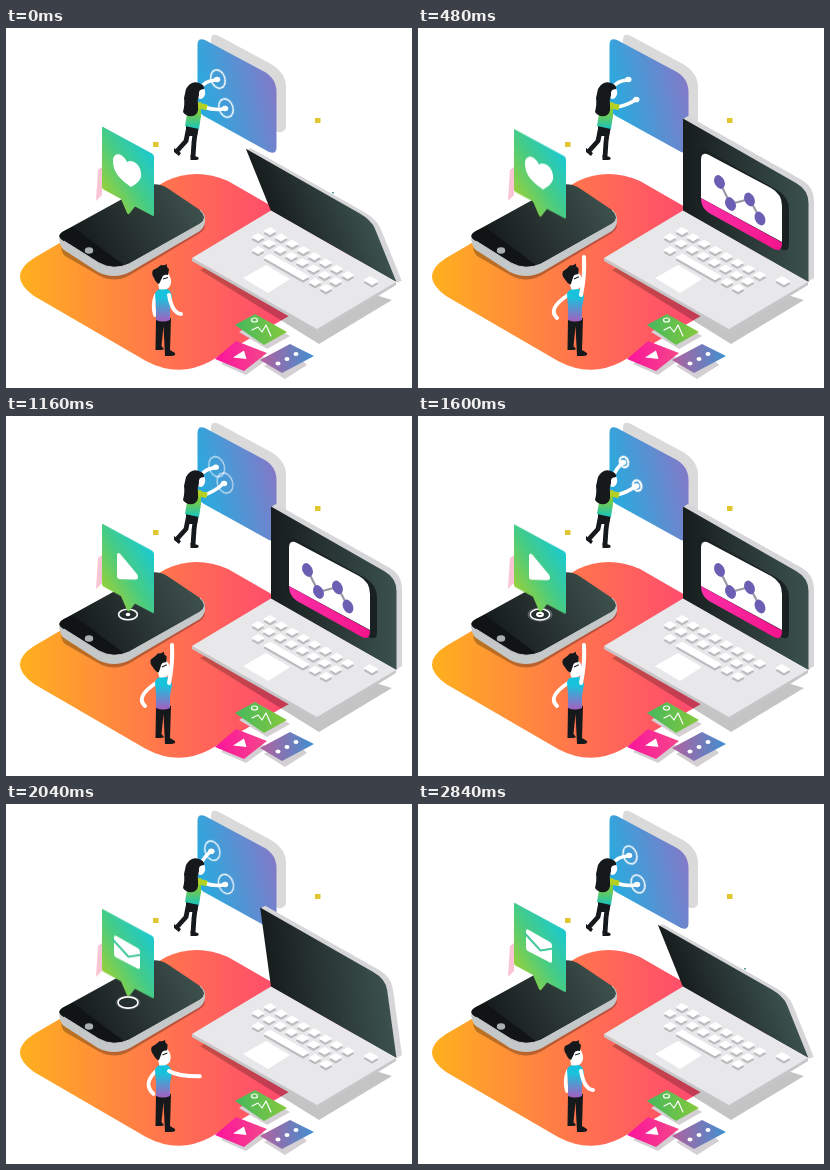
An HTML page for the animation above (2880 ms loop, 406x360 px).

```html
<!DOCTYPE html>
<html lang="en">
<head>
<meta charset="utf-8">
<title>Isometric devices</title>
<style>
html, body { margin: 0; width: 100%; height: 100%; overflow: hidden; background: #fff; }
svg { display: block; width: 100%; height: 100%; }
.line { fill: none; stroke: #fff; stroke-linecap: round; stroke-linejoin: round; }

#bubble { animation: bob 2880ms infinite; }
@keyframes bob {
  0%, 100% { transform: translateY(0); animation-timing-function: cubic-bezier(.37,0,.63,1); }
  50% { transform: translateY(10px); animation-timing-function: cubic-bezier(.37,0,.63,1); }
}

.icon { animation: show 2880ms steps(1) infinite; }
.play { animation-delay: -1920ms; }
.mail { animation-delay: -960ms; }
@keyframes show { 0% { visibility: visible; } 33.333%, 100% { visibility: hidden; } }

#screen { animation: screen 2880ms linear infinite; }
@keyframes screen { 0%, 6.5% { opacity: 0; } 16.5%, 56% { opacity: 1; } 63%, 100% { opacity: 0; } }

.ripple { fill: none; stroke: #fff; animation: ripple 2880ms linear infinite; }
@keyframes ripple {
  0% { rx: 0; ry: 0; stroke-width: 2.4px; opacity: 1; animation-timing-function: ease-out; }
  19% { rx: 10px; ry: 5.6px; stroke-width: 1.6px; opacity: 1; }
  35%, 100% { rx: 12.5px; ry: 7px; stroke-width: .8px; opacity: 0; }
}

.tap { fill: none; stroke: #fff; animation: tap 960ms -400ms linear infinite; }
@keyframes tap {
  0% { rx: 3px; ry: 4px; stroke-width: 2.6px; opacity: 1; animation-timing-function: ease-out; }
  54% { rx: 7.2px; ry: 10px; stroke-width: 1.3px; opacity: 1; }
  84%, 100% { rx: 8.5px; ry: 11.5px; stroke-width: .7px; opacity: 0; }
}
</style>
</head>
<body>
<svg viewBox="0 0 406 360">
  <defs>
    <linearGradient id="rugFill"><stop stop-color="#ffb01e"/><stop offset=".45" stop-color="#ff7150"/><stop offset=".75" stop-color="#ff4d6c"/><stop offset="1" stop-color="#ff4570"/></linearGradient>
    <linearGradient id="panelFill" x1="0" y1=".75" x2="1" y2=".4"><stop stop-color="#1fb0e0"/><stop offset="1" stop-color="#8379c8"/></linearGradient>
    <linearGradient id="bubbleFill" x1=".15" y1="1" x2=".95" y2=".2"><stop stop-color="#a8d22a"/><stop offset=".5" stop-color="#48cc83"/><stop offset="1" stop-color="#16c9d8"/></linearGradient>
    <linearGradient id="glass"><stop stop-color="#171d1d"/><stop offset="1" stop-color="#3b514d"/></linearGradient>
    <linearGradient id="phoneFill" x1="0" y1=".6" x2="1" y2=".3"><stop stop-color="#111516"/><stop offset="1" stop-color="#3f524e"/></linearGradient>
    <linearGradient id="manShirt" x1="0" y1="0" x2="0" y2="1"><stop offset=".25" stop-color="#17c3dc"/><stop offset="1" stop-color="#a55fc0"/></linearGradient>
    <linearGradient id="womanShirt" x1="0" y1="0" x2="0" y2="1"><stop stop-color="#b6d021"/><stop offset=".4" stop-color="#79cc42"/><stop offset="1" stop-color="#17c4c0"/></linearGradient>
    <linearGradient id="greenCard"><stop stop-color="#45b85e"/><stop offset="1" stop-color="#86c93c"/></linearGradient>
    <linearGradient id="pinkCard"><stop stop-color="#fb149a"/><stop offset="1" stop-color="#f5478c"/></linearGradient>
    <linearGradient id="purpleCard"><stop stop-color="#b4609f"/><stop offset="1" stop-color="#3f90d0"/></linearGradient>
    <linearGradient id="strip"><stop stop-color="#fb2fa6"/><stop offset="1" stop-color="#f4148c"/></linearGradient>
  </defs>

  <!-- rug -->
  <path fill="url(#rugFill)" d="M28 230L160 153Q190 139 222 153L335 218Q369 238 335 258L203 334Q172 350 140 333L28 268Q0 248 28 230Z"/>

  <!-- wall panel -->
  <path fill="#dadada" d="M205 12Q205 4 213 8L265 36Q280 45 280 59V98Q280 105 272 104L205 66Z"/>
  <path fill="url(#panelFill)" d="M191.500 17Q191.500 9 199 12L257 43Q270.500 50 270.500 64V119Q270.500 127 263 124L198 88Q191.500 84 191.500 78Z"/>

  <path fill="#e0c62f" d="M147 114h5.500v5h-5.500zM309 90h5.500v5h-5.500z"/>
  <path fill="#5f9f99" d="M326 164h2v1.500h-2z"/>
  <path fill="#f9c4d4" d="M92 142L96 139V167L90 173Z"/>

  <!-- phone -->
  <g>
    <path fill="#000" opacity=".27" d="M57 217L150 164L197 193Q202 199 194 205L124 247Q108 256 92 247L59 228Q53 222 57 217Z"/>
    <path fill="#c4c8c9" d="M53 207L199 190Q200 198 194 203L124 244Q108 252 92 244L58 222Q53 218 53 207Z"/>
    <path fill="url(#phoneFill)" d="M58 203L138 159Q150 153 162 160.500L194 182Q203 190 194 196L123 236Q108 243 93 235L58 213Q49 208 58 203Z"/>
    <path fill="#101415" d="M67 199L117 236.500Q106 242 93 235L58 213Q49 208 58 203Z"/>
    <path fill="none" stroke="#c9cdce" d="M194 182Q203 190 194 196L123 236Q108 243 93 235L58 213"/>
    <ellipse cx="83" cy="222.500" rx="4.200" ry="3.200" fill="#a9afb0"/>
    <ellipse class="ripple" cx="122" cy="198.500" style="animation-delay:-2160ms"/>
    <ellipse class="ripple" cx="122" cy="198.500" style="animation-delay:-1760ms"/>
    <ellipse class="ripple" cx="122" cy="198.500" style="animation-delay:-1380ms"/>
  </g>

  <g id="bubble">
    <path fill="url(#bubbleFill)" d="M96 100Q96 98 98 99.500L146 125.500Q148 126.500 148 129V186Q148 189 146 187.500L129 178.500L123.500 185.500Q122 187 121 185L115 171L97.500 161.500Q96 160.500 96 159Z"/>
    <path class="icon" fill="#fff" d="M121 134C116 124 107 124 107 133C107 145 115 152 125 159C132 155 136 151 135 145C134 135 125 131 121 134Z"/>
    <path class="icon play" fill="#fff" d="M111 130Q111 127 114 128.500L131 149Q134 154 129 154.500L114 154Q111 154 111 151Z"/>
    <g class="icon mail">
      <path fill="#fff" d="M108 127Q108 124 111 126L132 138Q134 139 134 142V157Q134 160 131 158L110 147Q108 146 108 143Z"/>
      <path fill="none" stroke="#42c79a" stroke-width="2" d="M107 129.500L122.500 146.500L135 144.500"/>
    </g>
  </g>

  <!-- laptop -->
  <path fill="#000" opacity=".23" d="M194 242L230 225L386 272L313 316Z"/>
  <g id="lid">
    <path id="rim" fill="#d6d6d8" d="M265 91L270 88L384 152Q396 159 396 173V250L390 254L265 183Z"/>
    <path fill="url(#glass)" d="M265 90.500L378 155Q390.500 162 390.500 175V254L265 183Z"/>
    <g id="screen">
      <path fill="#1a2122" d="M279 127Q279 118 287 122L359 162Q371 169 371 181V216Q371 225 363 221L286 180Q279 176 279 169Z"/>
      <path fill="#fff" d="M283 132Q283 123 291 127L353 160Q364 166 364 178V214L283 170Z"/>
      <path fill="url(#strip)" d="M283 170L364 214.500Q364 225 356 221L291 185Q283 180 283 170Z"/>
      <path fill="none" stroke="#9a9aa5" stroke-width="2.200" d="M301.500 154L312.500 176L331.500 171L342 190.500"/>
      <g id="nodes" fill="#6b5fb4"></g>
    </g>
  </g>
  <path fill="#c6c6c9" d="M186 230L311 300L390 253V257L312 305L186 233Z"/>
  <path fill="#e8e8ea" d="M265 182.500L390 254L311 301L186 230Z"/>
  <path fill="#fff" d="M260 237L284 251L262 265L237 250Z"/>
  <g id="keys"></g>

  <!-- cards -->
  <g fill="#d3cfd2">
    <path d="M233 304L254 291L284 308L261 321Z"/><path d="M215 336L233 319L262 331L240 347Z"/><path d="M258 338L286 322L301 337L279 351Z"/>
  </g>
  <path fill="url(#greenCard)" d="M229 297L249 286L281 304L258 317Z"/>
  <path class="line" stroke-width="1.200" d="M246 302L252 299L256 304L260 297L265 308"/>
  <ellipse class="line" cx="248.500" cy="292" rx="3" ry="2" stroke-width="1.200"/>
  <path fill="url(#pinkCard)" d="M209 331L230 313L261 325L238 343Z"/>
  <path fill="#fff" d="M227 329.500L238 322.500L240.500 331Z"/>
  <path fill="url(#purpleCard)" d="M254 332L284 316L308 328L276 345Z"/>
  <g fill="#fff"><ellipse cx="272" cy="335.500" rx="2.500" ry="2"/><ellipse cx="281" cy="331" rx="2.500" ry="2"/><ellipse cx="290" cy="326" rx="2.500" ry="2"/></g>

  <!-- woman -->
  <g>
    <path fill="none" stroke="#15191b" stroke-width="4.800" stroke-linejoin="round" d="M183 98L180 113L171 123M190 98L188 114L187 129"/>
    <path fill="#15191b" d="M180 97L193 99L191 108H180ZM168 120L175 125L173 128L168 124ZM184.500 127L192 129Q194 132 190 132H184.500Z"/>
    <path fill="url(#womanShirt)" d="M183 75L195 74L195 88L193 101L179 98L181 86Z"/>
    <path class="line" id="armTop" stroke-width="3.600"/>
    <path class="line" id="armLow" stroke-width="3.600"/>
    <path fill="none" stroke="#b4d022" stroke-width="5.500" d="M191 77L201 79.500"/>
    <ellipse cx="194.500" cy="64.500" rx="4.700" ry="6.500" fill="#fff"/>
    <path fill="#15191b" d="M180 61Q185 52 193 55Q199 57 198 61Q192 61 193 67Q191 72 192 78Q193 86 187 88Q180 89 177 84Q179 76 178 70Z"/>
    <g id="handTop"><ellipse cx="-1" cy=".5" rx="3.200" ry="2.800" fill="#fff"/><ellipse class="tap" transform="rotate(-20)"/></g>
    <g id="handLow"><ellipse cx="-1" cy=".5" rx="3.200" ry="2.800" fill="#fff"/><ellipse class="tap" transform="rotate(-20)"/></g>
  </g>

  <!-- man -->
  <g>
    <path class="line" id="armLeft" stroke-width="3.800"/>
    <path fill="#15191b" d="M150 290H165L164 322L169 325Q170 328 165 328H159L157.500 298L155.500 318L158 321Q157 322 155 322H149.500Z"/>
    <path fill="url(#manShirt)" d="M149 266Q150 262 154 261H161Q165 262 166 269L164 280V292Q157 295 150 292V279Z"/>
    <path class="line" id="armRight" stroke-width="4"/>
    <g id="head">
      <path fill="#fff" d="M151 248L162 245Q167 252 164 258Q161 263 153 261Z"/>
      <path fill="#15191b" d="M147 242Q152 240 155 237Q158 238 161 236Q160 239 163 241L162 247Q157 246 156 250L153 256Q150 255 148 250Q145 246 147 242Z"/>
      <path fill="none" stroke="#15191b" stroke-width="1" d="M157 251L162 249.500"/>
    </g>
  </g>
</svg>
<script>
const LOOP = 2880;
const el = id => document.getElementById(id);
const mix = (a, b, p) => a + (b - a) * p;
const ease = (t, from, to) => {
  const p = Math.min(1, Math.max(0, (t - from) / (to - from)));
  return p * p * (3 - 2 * p);
};

// Each hand key: time, x, y
const topHand = [[0, 212, 51], [760, 211, 51], [1100, 211, 51], [1520, 206, 46], [2360, 206.5, 47], [2520, 212, 51], [LOOP, 212, 51]];
const lowHand = [[0, 220, 80], [760, 219, 67], [1440, 219, 67], [2000, 220, 80], [LOOP, 220, 80]];

function along(keys, t) {
  const i = keys.findIndex(k => k[0] > t);
  const [a, b] = [keys[i - 1], keys[i]];
  const p = ease(t, a[0], b[0]);
  return [mix(a[1], b[1], p), mix(a[2], b[2], p)];
}

// Smooth pose through lowered, middle (p = .6) and raised points
function pose(low, mid, high, p) {
  const l = (p - .6) * (p - 1) / .6, m = p * (p - 1) / -.24, h = p * (p - .6) / .4;
  return low.map((v, i) => v * l + mid[i] * m + high[i] * h);
}

function addKey(x, y, length = 0) {
  const dy = length * .568;
  const top = `M${x - 6} ${y}L${x} ${y - 3.5}L${x + 6 + length} ${y + dy}L${x + length} ${y + dy + 3.5}Z`;
  el('keys').innerHTML += `<path d="${top}" transform="translate(0 2.500)" fill="#bcbcc0" stroke="#bcbcc0" stroke-linejoin="round"/>` +
    `<path d="${top}" fill="#fff" stroke="#fff" stroke-linejoin="round"/>`;
}
for (let i = 0; i < 8; i++) addKey(264 + 11.1 * i, 203 + 6.3 * i);
for (let i = 0; i < 8; i++) addKey(252 + 11.1 * i, 209 + 6.3 * i);
addKey(364, 252, 2);
addKey(252, 222);
addKey(264, 229.500, 33);
addKey(309, 254);
addKey(320, 260);

for (const [x, y] of [[301.5, 154], [312.5, 176], [331.5, 171.5], [342, 190.5]])
  el('nodes').innerHTML += `<ellipse rx="5" ry="7.200" transform="translate(${x} ${y}) rotate(-25)"/>`;

function reach(arm, hand, start, bend, [x, y]) {
  el(arm).setAttribute('d', `M${start}Q${bend} ${x - 2} ${y + 1}`);
  el(hand).setAttribute('transform', `translate(${x} ${y})`);
}

function draw(t) {
  const open = ease(t, 0, 280) - ease(t, 1840, 2280);

  // Shear about the hinge line y = 32.5 + .568x
  const kx = -25 / 92 * (1 - open), ky = 30 / 92 * (1 - open);
  el('lid').setAttribute('transform',
    `matrix(${[1 + .568 * kx, .568 * ky, -kx, 1 - ky, 32.5 * kx, 32.5 * ky]})`);
  el('rim').setAttribute('transform', `translate(${2 * (1 - open)} 0)`);

  const right = pose([166, 285, 175, 286], [172, 271, 193, 270], [167, 248, 166, 229], open);
  const left = pose([146, 276, 149, 287], [136, 280, 147, 290], [129, 281, 139, 290], open);
  el('armRight').setAttribute('d', `M163 267Q${right}`);
  el('armLeft').setAttribute('d', `M150 267Q${left}`);
  el('head').setAttribute('transform', `rotate(${-8 * open} 156 258)`);

  const low = along(lowHand, t);
  reach('armTop', 'handTop', '195 60', '198 53', along(topHand, t));
  reach('armLow', 'handLow', '198 79', `208 ${mix(79, low[1], .5) + 3}`, low);
}

let start;
function tick(now) {
  start ??= now;
  draw((now - start) % LOOP);
  requestAnimationFrame(tick);
}
draw(0);
requestAnimationFrame(tick);
</script>
</body>
</html>
```
